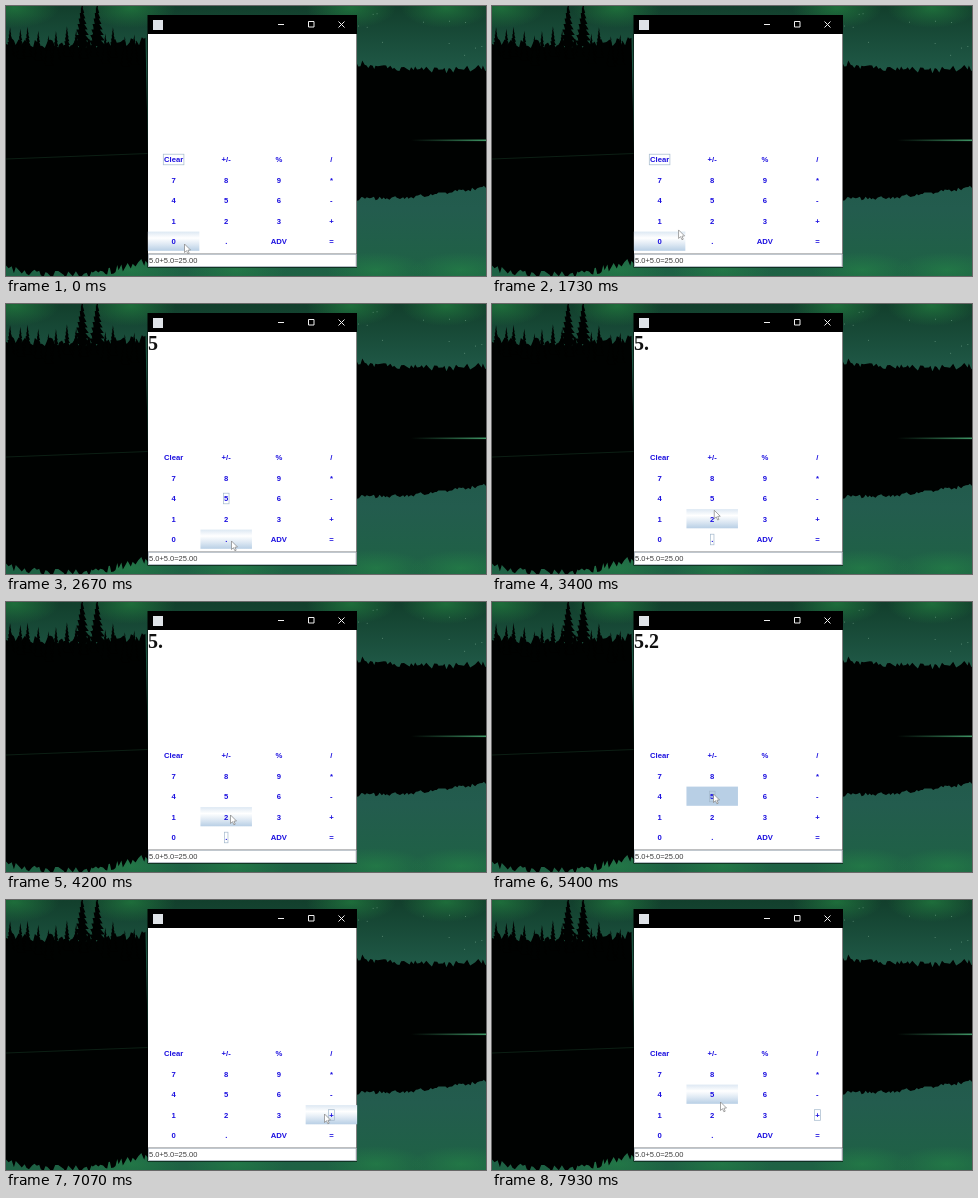
Animation, 480 px wide and 270 px high, one loop 8 s. Source, as an HTML page with a canvas:

```html
<!DOCTYPE html>
<html lang="en">
<head>
<meta charset="utf-8">
<title>Calculator</title>
<style>
html, body { margin: 0; width: 100%; height: 100%; overflow: hidden; background: #000; }
canvas { display: block; width: 480px; height: 270px; }
</style>
</head>
<body>
<canvas id="stage" width="480" height="270"></canvas>
<script>
const W = 480, H = 270, LOOP = 8000, STEP = 200 / 3;
const ctx = document.getElementById('stage').getContext('2d');

const SANS = '"Liberation Sans", Arial, sans-serif';
const SERIF = '"Liberation Serif", "Times New Roman", serif';
const BTN_W = 51.5, BTN_H = 19.2;
const KEYS = 'Clear +/- % / 7 8 9 * 4 5 6 - 1 2 3 + 0 . ADV ='.split(' ').map((label, i) => ({
  label,
  x: 167.6 + 52.6 * (i % 4),
  y: 153.2 + 20.5 * Math.floor(i / 4)
}));

// Pointer legs: start, end, and where it comes to rest
const START = { x: 178, y: 238 };
const LEGS = [
  [1667, 1733, 186, 224], [1733, 2000, 220, 195], [2533, 2667, 225, 237],
  [3200, 3533, 221, 199], [3667, 3800, 224, 213], [4800, 5133, 221, 192],
  [5600, 6000, 311, 228], [6067, 6200, 318, 214], [7133, 7600, 268, 225],
  [7600, 7867, 228, 202]
];
// Clicks: press, release, key
const CLICKS = [
  [2400, 2467, '5'], [3000, 3133, '.'], [4400, 4533, '2'], [5400, 5467, '5'], [6800, 6933, '+']
];

const easeOut = k => Math.sin(k * Math.PI / 2);

function pointerAt(t) {
  let { x, y } = START;
  for (const [from, to, tx, ty] of LEGS) {
    if (t <= from) break;
    const k = easeOut(Math.min(1, (t - from) / (to - from)));
    x += (tx - x) * k;
    y += (ty - y) * k;
  }
  return { x, y };
}

function keyAt({ x, y }) {
  return KEYS.find(k => Math.abs(x - k.x) < BTN_W / 2 && Math.abs(y - k.y) < BTN_H / 2);
}

function stateAt(t) {
  const state = { focus: 'Clear', display: '', pressed: null };
  for (const [down, up, label] of CLICKS) {
    if (t < down - 5) break;
    state.focus = label;
    if (t < up - 5) state.pressed = label;
    else state.display = label === '+' ? '' : state.display + label;
  }
  state.hover = keyAt(pointerAt(t - STEP / 2))?.label;
  return state;
}

function seeded(seed) {
  return () => (seed = (seed * 16807) % 2147483647) / 2147483647;
}

function gradient(c, x0, y0, x1, y1, ...colors) {
  const g = c.createLinearGradient(x0, y0, x1, y1);
  colors.forEach((color, i) => g.addColorStop(i / (colors.length - 1), color));
  return g;
}

function glow(c, x, y, rx, ry, rgb, alpha) {
  c.save();
  c.translate(x, y);
  c.scale(rx, ry);
  const g = c.createRadialGradient(0, 0, 0, 0, 0, 1);
  g.addColorStop(0, `rgba(${rgb},${alpha})`);
  g.addColorStop(1, `rgba(${rgb},0)`);
  c.fillStyle = g;
  c.fillRect(-1, -1, 2, 2);
  c.restore();
}

// Ragged forest edge from (x0, y0) to (x1, y1), bowed in the middle, filled to base
function forest(c, x0, y0, x1, y1, bow, jag, base, rnd) {
  c.beginPath();
  c.moveTo(x0, base);
  for (let x = x0; x < x1 + 4; x += 1.2 + rnd() * 2) {
    const k = (x - x0) / (x1 - x0);
    c.lineTo(x, y0 + (y1 - y0) * k + bow * Math.sin(Math.PI * k) + (rnd() - 0.5) * jag);
  }
  c.lineTo(x1 + 4, base);
  c.fill();
}

function spruce(c, x, top, height, width) {
  c.beginPath();
  c.moveTo(x, top);
  for (const side of [1, -1]) {
    for (let i = 1; i <= 8; i++) {
      const k = (side > 0 ? i : 9 - i) / 8;
      c.lineTo(x + side * width * k, top + height * k);
      c.lineTo(x + side * width * k * 0.5, top + height * k);
    }
  }
  c.fill();
}

function paintBackdrop() {
  const layer = document.createElement('canvas');
  layer.width = W;
  layer.height = H;
  const c = layer.getContext('2d');
  const rnd = seeded(41);

  c.fillStyle = gradient(c, 0, 0, 0, 136, '#123f2c', '#205a48', '#1f5a48');
  c.fillRect(0, 0, W, 136);
  c.fillStyle = gradient(c, 0, 136, 0, H, '#205848', '#235c4e', '#1e6244');
  c.fillRect(0, 136, W, H - 136);
  for (const x of [8, 125, 345, 440]) glow(c, x, 2, 45, 20, '38,140,68', 0.6);
  for (const x of [125, 230, 370, 455]) glow(c, x, 264, 50, 18, '38,140,72', 0.5);

  c.fillStyle = 'rgba(190,235,205,.5)';
  for (let i = 0; i < 12; i++) c.fillRect(352 + rnd() * 126, rnd() * 50, 0.8, 0.8);

  c.fillStyle = '#000201';
  forest(c, 0, 36, 138, 36, 2, 10, 151, rnd);
  forest(c, 0, 262, 138, 256, 10, 8, 149, rnd);
  forest(c, 350, 57, 480, 62, 4, 7, 136, rnd);
  forest(c, 350, 193, 480, 181, 3, 4, 134, rnd);
  for (let x = 4; x < 140; x += 7 + rnd() * 7) spruce(c, x, 17 + rnd() * 14, 30, 5);
  for (const x of [76, 91]) spruce(c, x, -4, 44, 9);

  c.strokeStyle = 'rgba(30,75,48,.4)';
  c.beginPath();
  c.moveTo(0, 153);
  c.lineTo(142, 147.5);
  c.stroke();
  c.fillStyle = gradient(c, 405, 0, 480, 0, 'rgba(60,150,100,0)', 'rgba(70,165,112,.9)');
  c.fillRect(405, 133.5, 75, 1.6);
  return layer;
}

function box(x, y, w, h, color) {
  ctx.fillStyle = color;
  ctx.fillRect(x, y, w, h);
}

function text(str, x, y, font, color, align) {
  ctx.font = font;
  ctx.fillStyle = color;
  ctx.textAlign = align;
  ctx.fillText(str, x, y);
}

function paintWindow() {
  box(141.5, 9, 209.5, 252.5, '#000');
  box(142, 28, 208.5, 219.5, '#fff');
  box(147, 14, 10, 10, '#dfe3e8');

  ctx.strokeStyle = '#f0f0f0';
  ctx.lineWidth = 1;
  ctx.beginPath();
  ctx.moveTo(272, 18.5);
  ctx.lineTo(278, 18.5);
  ctx.rect(302.5, 15.5, 5.5, 5.5);
  ctx.moveTo(332.5, 15.5);
  ctx.lineTo(338.5, 21.5);
  ctx.moveTo(338.5, 15.5);
  ctx.lineTo(332.5, 21.5);
  ctx.stroke();

  box(142, 247.5, 208.5, 13.5, '#fff');
  ctx.strokeStyle = '#a5afb9';
  ctx.lineWidth = 0.8;
  ctx.strokeRect(142.4, 248.3, 207.7, 12.2);
  text('5.0+5.0=25.00', 143, 257.2, `7.5px ${SANS}`, '#3c3c3c', 'left');
}

function paintKey({ label, x, y }, state) {
  const left = x - BTN_W / 2, top = y - BTN_H / 2;
  if (state.pressed === label) {
    box(left, top, BTN_W, BTN_H, '#b8cfe5');
  } else if (state.hover === label) {
    box(left, top, BTN_W, BTN_H,
      gradient(ctx, 0, top, 0, top + BTN_H, '#dde8f3', '#fff', '#dde8f3', '#b8cfe5'));
  }
  text(label, x, y + 3.1, `bold 7.7px ${SANS}`, '#1c10e0', 'center');
  if (state.focus === label) {
    const w = ctx.measureText(label).width + 1.4;
    ctx.strokeStyle = '#a3b8cc';
    ctx.lineWidth = 0.7;
    ctx.strokeRect(x - w / 2, y - 5, w, 10.6);
  }
}

function paintPointer({ x, y }) {
  const shape = [[0, 0], [0, 8.5], [2, 6.7], [3.4, 9.8], [4.7, 9.2], [3.4, 6.2], [6, 6]];
  ctx.beginPath();
  shape.forEach(([dx, dy]) => ctx.lineTo(x + 0.5 + dx, y + dy));
  ctx.closePath();
  ctx.fillStyle = '#fff';
  ctx.fill();
  ctx.strokeStyle = '#808080';
  ctx.lineWidth = 0.7;
  ctx.stroke();
}

const backdrop = paintBackdrop();

function frame(now) {
  const t = Math.floor((now % LOOP) / STEP + 0.1) * STEP;
  const state = stateAt(t);
  ctx.drawImage(backdrop, 0, 0);
  paintWindow();
  text(state.display, 142, 45.5, `bold 20px ${SERIF}`, '#111', 'left');
  KEYS.forEach(key => paintKey(key, state));
  paintPointer(pointerAt(t));
  requestAnimationFrame(frame);
}
requestAnimationFrame(frame);
</script>
</body>
</html>
```
